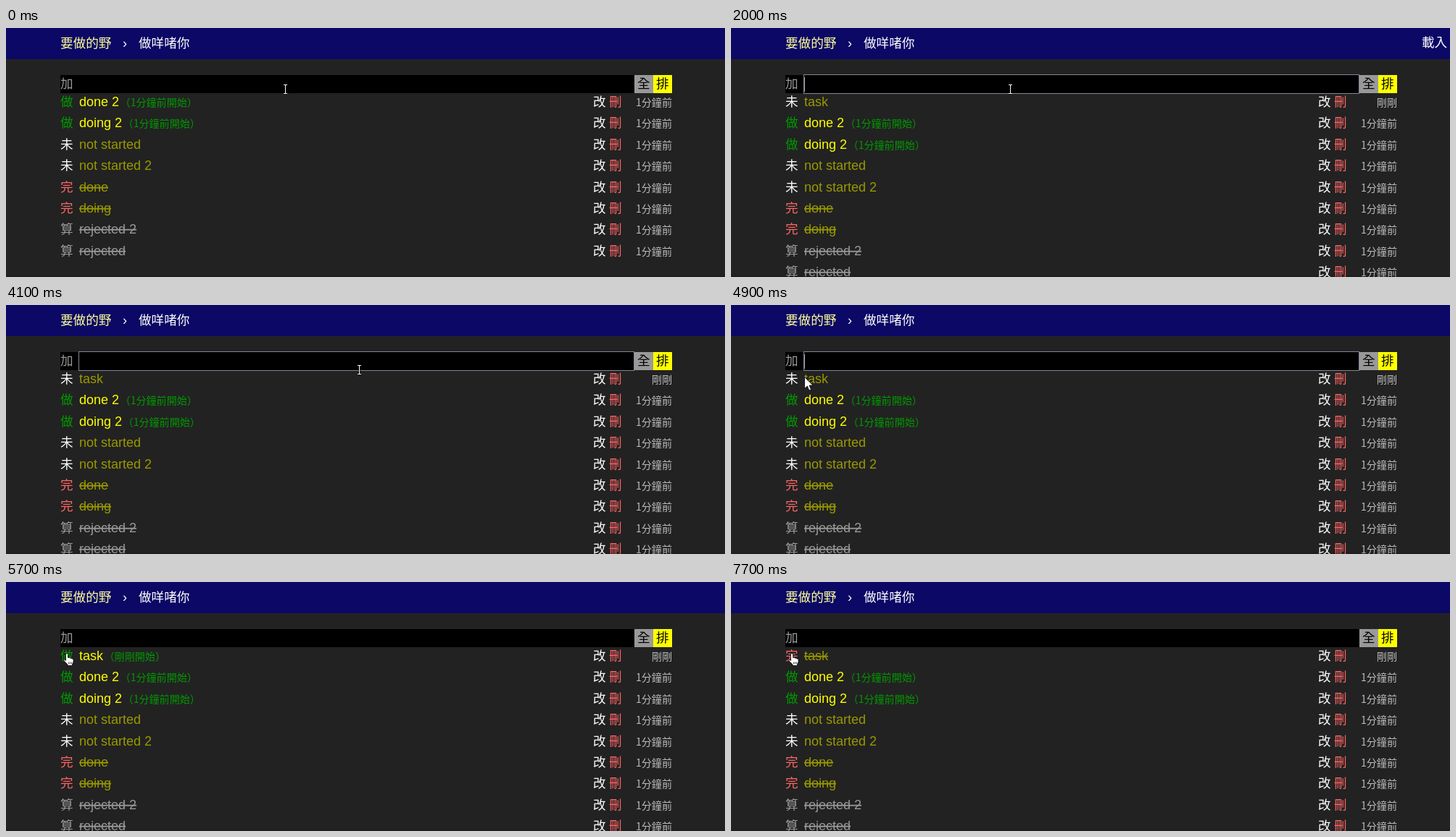
Animation of 992x344 px, one loop 8000 ms. Source, as an HTML page:

```html
<!DOCTYPE html>
<html lang="zh-HK">
<head>
<meta charset="utf-8">
<title>要做的野</title>
<style>
  html, body { margin: 0; width: 100%; height: 100%; overflow: hidden; background: #222; }
  svg { display: block; width: 992px; height: 344px; }
  text {
    font: 17.6px "Noto Sans CJK HK", "Noto Sans CJK TC", "Noto Sans CJK JP", "Noto Sans CJK", sans-serif;
    white-space: pre;
  }
  .latin { font: 18px "Liberation Sans", sans-serif; }
  .small { font: 14.08px "Noto Sans CJK HK", "Noto Sans CJK TC", "Noto Sans CJK JP", "Noto Sans CJK", sans-serif; }
  .strike { text-decoration: line-through; }
</style>
</head>
<body>
<svg viewBox="0 0 992 344">
  <rect width="992" height="344" fill="#222"/>
  <rect width="992" height="43" fill="#0b0866"/>
  <text x="75" y="27" fill="#ff9">要做的野</text>
  <text x="161" y="27" fill="#fff" class="latin">›</text>
  <text x="183" y="27" fill="#fff">做咩啫你</text>
  <text id="busy" x="953" y="26" fill="#fff">載入</text>

  <rect x="75" y="65" width="792" height="25"/>
  <rect x="867" y="65" width="26" height="25" fill="#999"/>
  <rect x="893" y="65" width="26" height="25" fill="#ff0"/>
  <text x="75" y="83" fill="#999">加</text>
  <text x="871" y="83">全</text>
  <text x="897" y="83">排</text>
  <rect id="ring" x="100.5" y="64.5" width="766" height="26" fill="none" stroke="#7f8794"/>
  <text id="typed" x="101" y="83" fill="#999" class="latin"></text>
  <rect id="caret" y="68" width="1" height="20" fill="#999"/>

  <g id="list"></g>
  <rect y="342" width="992" height="2" opacity=".12"/>

  <g id="beam" fill="none">
    <path d="M-2.5-6h5M0-6v12M-2.5 6h5" stroke="#000" stroke-width="2"/>
    <path d="M-2.5-6h5M0-6v12M-2.5 6h5" stroke="#fff"/>
  </g>
  <path id="arrow" d="M0 0V16L3.8 12.6L6.3 18.5L9 17.3L6.5 11.6H11.5Z" fill="#fff" stroke="#000" stroke-width=".8"/>
  <g id="hand">
    <path d="M3 1.5Q3 0 4.5 0T6 1.5V6Q8 5 8.7 6.6Q10.5 6 11 7.4Q13.4 7 13.5 9V12L12 15.5V17H5.5V15.5L1 11Q-.5 9 1 8.5L3 10Z" fill="#fff" stroke="#000" stroke-width=".8"/>
    <path d="M7 12v3M9 12v3M11 12v3" stroke="#000" stroke-width=".7"/>
  </g>
</svg>
<script>
const LOOP = 8000;
const $ = id => document.getElementById(id);

const KINDS = {
  doing:    { mark: '做', ink: '#090', text: '#ff0' },
  waiting:  { mark: '未', ink: '#fff', text: '#990' },
  done:     { mark: '完', ink: '#f66', text: '#990', strike: true },
  rejected: { mark: '算', ink: '#999', text: '#999', strike: true }
};
const AGO = '1分鐘前';
const TASKS = [
  ['doing', 'done 2'], ['doing', 'doing 2'],
  ['waiting', 'not started'], ['waiting', 'not started 2'],
  ['done', 'done'], ['done', 'doing'],
  ['rejected', 'rejected 2'], ['rejected', 'rejected']
];

// Each track: [start time, value...]; a value holds until the next entry.
const NEW_TASK = [[0, ''], [2000, 'waiting'], [5400, 'doing'], [7400, 'done']];
const TYPED = [[0, ''], [1100, 'ta'], [1500, 'task'], [2000, '']];
const CARET = [[0, 0], [300, 101], [800, 0], [1100, 116], [1500, 134], [2000, 101],
  [3800, 0], [4300, 101], [5300, 0]];
const FOCUS = [[0, false], [300, true], [5300, false]];
const BUSY = [[0, false], [2000, true], [2300, false], [5400, true], [5700, false],
  [7400, true], [7700, false]];
const POINTER = [
  [0, 'beam', 385.5, 84.5], [3400, 'beam', 374.5, 85.5], [3500, 'beam', 377.5, 87.5],
  [3600, 'arrow', 386, 94], [3700, 'arrow', 403, 99], [3800, 'arrow', 425, 100],
  [3900, 'arrow', 447, 97], [4000, 'arrow', 468, 93], [4100, 'beam', 487.5, 89.5],
  [4200, 'beam', 516.5, 82.5], [4300, 'beam', 554.5, 75.5], [4400, 'beam', 530.5, 72.5],
  [4500, 'beam', 440.5, 74.5], [4600, 'beam', 310.5, 80.5], [4700, 'arrow', 195, 91],
  [4800, 'arrow', 126, 97], [4900, 'arrow', 101.5, 99.5], [5000, 'arrow', 95, 101],
  [5100, 'hand', 81.5, 99.5], [5200, 'hand', 80.5, 99.5], [5300, 'hand', 79.5, 98.5]
];

const at = (track, t) => track.findLast(step => step[0] <= t);
const show = (node, on) => node.setAttribute('visibility', on ? 'visible' : 'hidden');

function row([kind, name, ago = AGO], i) {
  const k = KINDS[kind];
  const y = Math.round(107.9 + 29.4 * i);
  const since = kind === 'doing' ? `<tspan dx="1.5" class="small" fill="#090">（${ago}開始）</tspan>` : '';
  return `<text x="75" y="${y}" fill="${k.ink}">${k.mark}</text>
    <text x="101" y="${y}" fill="${k.text}" class="latin ${k.strike ? 'strike' : ''}">${name}${since}</text>
    <text x="810" y="${y}" fill="#fff">改</text>
    <text x="832" y="${y}" fill="#f66">刪</text>
    <text x="919" y="${y}" fill="#bbb" text-anchor="end" class="small">${ago}</text>`;
}

let drawn = null;
function drawList(kind) {
  if (kind === drawn) return;
  drawn = kind;
  const tasks = kind ? [[kind, 'task', '剛剛'], ...TASKS] : TASKS;
  $('list').innerHTML = tasks.map(row).join('');
}

function draw() {
  const t = performance.now() % LOOP;
  drawList(at(NEW_TASK, t)[1]);
  $('typed').textContent = at(TYPED, t)[1];
  show($('ring'), at(FOCUS, t)[1]);
  show($('busy'), at(BUSY, t)[1]);

  const caret = at(CARET, t)[1];
  show($('caret'), caret);
  $('caret').setAttribute('x', caret);

  const [, shape, x, y] = at(POINTER, t);
  for (const id of ['beam', 'arrow', 'hand']) show($(id), id === shape);
  $(shape).setAttribute('transform', `translate(${x} ${y})`);
  requestAnimationFrame(draw);
}
draw();
</script>
</body>
</html>
```
